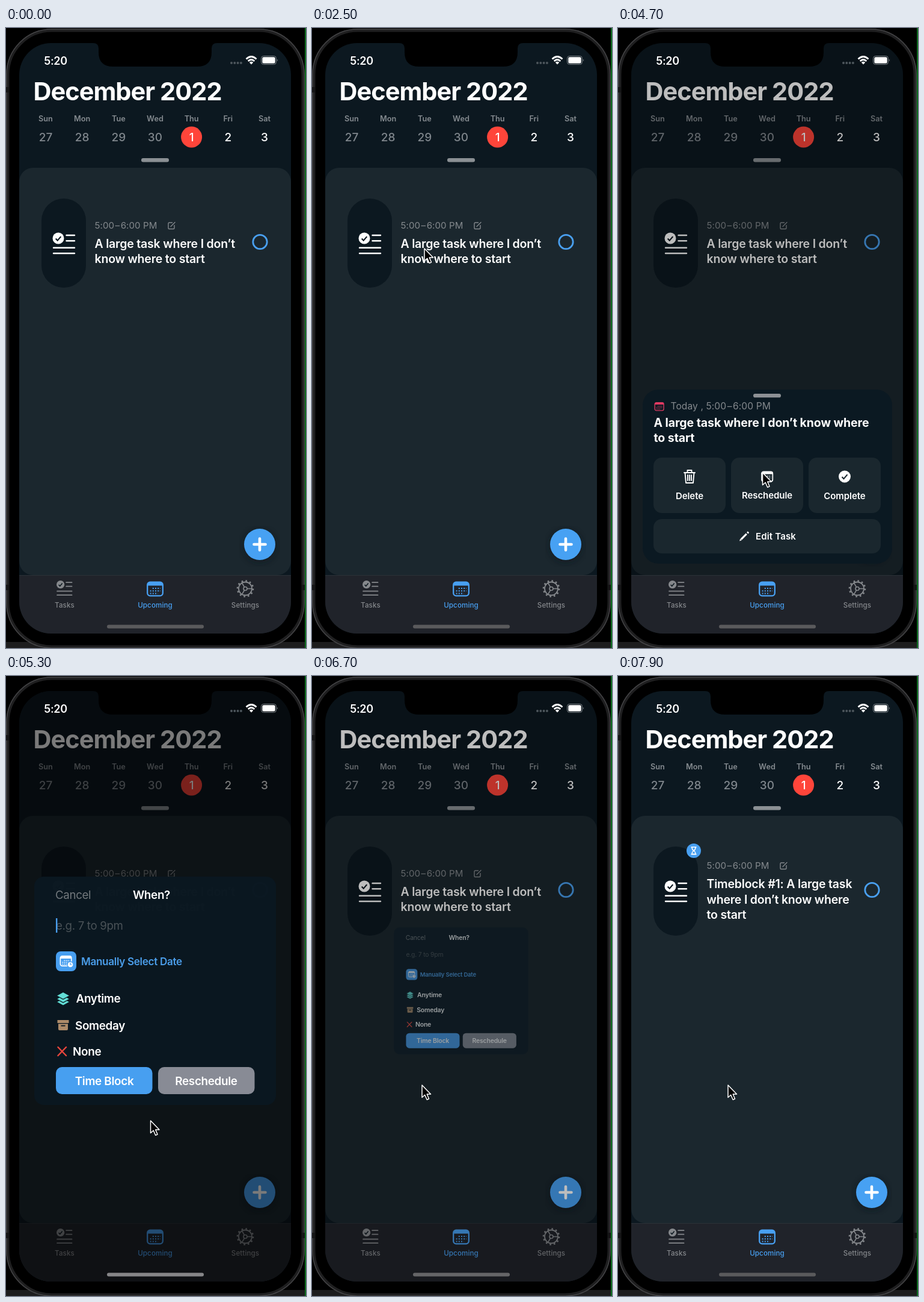
An HTML page that plays this animation: 499 px wide and 1029 px high, repeating every 8000 ms.

```html
<!DOCTYPE html>
<html lang="en">
<head>
<meta charset="utf-8">
<title>Time block a task</title>
<style>
html, body { margin: 0; height: 100%; overflow: hidden; background: #000; }
svg { display: block; width: 499px; height: 1029px; }
text { font-family: Inter, "Open Sans", sans-serif; font-optical-sizing: none; fill: #fff; white-space: pre; }
.mid { text-anchor: middle; }
.title { font-size: 41.5px; font-weight: 700; letter-spacing: -.0235em; }
.body { font-size: 19.5px; font-weight: 600; letter-spacing: -.01em; }
.bold { font-weight: 700; letter-spacing: -.004em; }
.small { font-size: 15px; font-weight: 600; letter-spacing: -.004em; }
.time { font-size: 15.1px; font-weight: 400; letter-spacing: .005em; fill: #84898d; }
.day { font-size: 12.7px; font-weight: 600; fill: #858b90; }
.date { font-size: 19px; font-weight: 500; }
.tab { font-size: 11.6px; font-weight: 500; fill: #85888c; letter-spacing: .01em; }
#modal .body { font-size: 18.9px; letter-spacing: -.018em; }
#modal .thin { font-size: 18.7px; font-weight: 400; }
#modal .link { font-size: 17.1px; fill: #4b9eea; }
.line { fill: none; stroke: currentColor; stroke-linecap: round; stroke-linejoin: round; }
</style>
</head>
<body>
<svg viewBox="0 0 499 1029">
  <defs>
    <clipPath id="screen"><rect x="22" y="25" width="452" height="980" rx="53"/></clipPath>
    <filter id="blur"><feGaussianBlur stdDeviation="5"/></filter>
    <symbol id="list" overflow="visible">
      <circle cx="9.5" cy="9.5" r="9.5" fill="currentColor"/>
      <path d="M5.2 10l3 3.2 5.6-6.6" fill="none" stroke="#0d1820" stroke-width="2.2"/>
      <path class="line" stroke-width="2.400" d="M23 4.500H36.500M23 13.800H36.500M1.500 25.200H36.500M1.500 34.500H36.500"/>
    </symbol>
    <symbol id="calendar" overflow="visible">
      <rect class="line" x="1.200" y="1.200" width="25.600" height="22.600" rx="4.500" stroke-width="2.300"/>
      <path d="M1 7V5q0-4 4-4H23q4 0 4 4V7z" fill="currentColor"/>
      <path d="M9.800 11.500H23M5.600 15.700H23M5.600 19.900H18.500" stroke="currentColor" stroke-width="2" stroke-dasharray="2 2.200" fill="none"/>
    </symbol>
    <symbol id="edit" overflow="visible">
      <path class="line" stroke-width="1.400" d="M7 1H2Q.5 1 .5 2.500V10Q.5 11.500 2 11.500H9Q10.500 11.500 10.500 10V5.500M4.500 7.500L11.500 .5"/>
    </symbol>
  </defs>

  <!-- phone body -->
  <rect width="499" height="1029" fill="#000"/>
  <rect y="1019" width="499" height="10" fill="#1d1d1e"/>
  <rect x="3" y="4" width="491" height="1023" rx="73" fill="#000" stroke="#1f1f20" stroke-width="5"/>
  <rect x="1" y="2" width="495" height="1027" rx="75" fill="none" stroke="#454547" stroke-width="1.500"/>
  <path d="M0 98H5V107H0zM0 924H5V933H0zM492 924H497V933H492z" fill="#151516"/>
  <path d="M498 0V1029" stroke="#0a6a1c" stroke-width="2"/>

  <g clip-path="url(#screen)">
    <rect x="22" y="25" width="452" height="980" fill="#0c1820"/>
    <text class="title" x="45.500" y="120">December 2022</text>
    <g id="week"></g>
    <rect x="225" y="216" width="46" height="6.500" rx="3.200" fill="#8b9094"/>
    <rect x="22" y="232" width="452" height="676" rx="23" fill="#1b272e"/>

    <rect x="59" y="283" width="74" height="148" rx="37" fill="#0c1820"/>
    <use href="#list" x="77.500" y="339.500" color="#fff"/>
    <g id="before">
      <text class="time" x="147.500" y="333">5:00&#8202;–&#8202;6:00 PM</text>
      <use href="#edit" x="269.500" y="322" color="#84898d"/>
      <text class="body" x="147.500" y="364.500">A large task where I don’t</text>
      <text class="body" x="147.500" y="390">know where to start</text>
    </g>
    <g id="after">
      <text class="time" x="147.500" y="320">5:00&#8202;–&#8202;6:00 PM</text>
      <use href="#edit" x="269.500" y="309" color="#84898d"/>
      <text class="body" x="147.500" y="352">Timeblock #1: A large task</text>
      <text class="body" x="147.500" y="377.500">where I don’t know where</text>
      <text class="body" x="147.500" y="403">to start</text>
      <circle cx="126" cy="290" r="12" fill="#489ff0"/>
      <path d="M121.500 284H130.500M121.500 296H130.500M123 284.500Q123 288 126 290Q123 292 123 295.500H129Q129 292 126 290Q129 288 129 284.500" fill="none" stroke="#fff" stroke-width="1.500"/>
    </g>
    <circle cx="422.500" cy="355" r="11.700" fill="none" stroke="#499fef" stroke-width="2.800"/>

    <circle cx="422" cy="860" r="28" fill="#0a141a" opacity=".5" filter="url(#blur)"/>
    <circle cx="422" cy="857" r="26" fill="#47a1f3"/>
    <path class="line" color="#fff" stroke-width="4.600" d="M412.500 857H431.500M422 847.500V866.500"/>

    <rect id="sheetDim" x="22" y="25" width="452" height="883"/>

    <g id="sheet">
      <rect x="41" y="600" width="415" height="289" rx="26" fill="#0b1922"/>
      <rect x="225" y="607" width="46" height="6.300" rx="3.100" fill="#8d9195"/>
      <use href="#calendar" transform="translate(60.500 621) scale(.58)" color="#e03a62"/>
      <text class="time" x="87.500" y="633.500" style="font-size:15.600px">Today , 5:00&#8202;–&#8202;6:00 PM</text>
      <text class="body bold" x="59.500" y="662">A large task where I don’t know where</text>
      <text class="body bold" x="59.500" y="687.500">to start</text>
      <g fill="#1a272e">
        <rect x="59" y="713" width="120" height="92" rx="14"/>
        <rect x="188" y="713" width="120" height="92" rx="14"/>
        <rect x="317" y="713" width="120" height="92" rx="14"/>
        <rect x="59" y="815" width="378" height="57" rx="14"/>
      </g>
      <path class="line" color="#fff" stroke-width="1.900" d="M110 738H128M115.500 737V734H122.500V737M111.500 738L113 755H125L126.500 738M116 742V751M119 742V751M122 742V751"/>
      <use href="#calendar" transform="translate(238 735.500) scale(.72)" color="#fff"/>
      <circle cx="377" cy="744.500" r="10" fill="#fff"/>
      <path d="M372.500 745l3 3.200 6-7" fill="none" stroke="#1a272e" stroke-width="2"/>
      <text class="small mid" x="119" y="782.500">Delete</text>
      <text class="small mid" x="248" y="781">Reschedule</text>
      <text class="small mid" x="377" y="782.500">Complete</text>
      <path d="M202 851.500l1.300-3.800 2.500 2.500z" fill="#fff"/>
      <path d="M204.800 848.700L213.800 839.700M215.200 838.300L217 836.500" stroke="#fff" stroke-width="3.200"/>
      <text class="small" x="229" y="849" style="letter-spacing:.01em">Edit Task</text>
    </g>

    <rect x="22" y="908" width="452" height="97" fill="#20232a"/>
    <path d="M22 908.500H474" stroke="#2b3137"/>
    <use href="#list" transform="translate(84 917) scale(.7)" color="#85888c"/>
    <use href="#calendar" x="234" y="918.500" color="#48a0f2"/>
    <g class="line" color="#85888c" transform="translate(398 930.500)">
      <circle r="11" stroke-width="1.800"/>
      <circle r="13" stroke-width="2.600" stroke-dasharray="2.600 4.207" stroke-linecap="butt"/>
      <circle r="3" stroke-width="1.600"/>
      <path stroke-width="1.600" d="M3 0H11M-1.500-2.600L-5.500-9.500M-1.500 2.600L-5.500 9.500"/>
    </g>
    <text class="tab mid" x="97.500" y="961.500">Tasks</text>
    <text class="tab mid" x="248" y="961.500" style="fill:#48a0f2">Upcoming</text>
    <text class="tab mid" x="398" y="961.500">Settings</text>

    <rect id="modalDim" x="22" y="25" width="452" height="980"/>

    <g id="modal">
      <rect x="47" y="333" width="402" height="379" rx="16" fill="#0b1821" opacity=".98"/>
      <text class="body thin" x="82" y="370" style="fill:#73797d">Cancel</text>
      <text class="body mid" x="242" y="370">When?</text>
      <text class="body thin" x="83" y="420.500" style="fill:#4a5257">e.g. 7 to 9pm</text>
      <rect id="caret" x="83" y="402" width="2.400" height="24" fill="#499fef"/>
      <rect x="83" y="457" width="34" height="33" rx="8" fill="#489ff0"/>
      <use href="#calendar" transform="translate(89.500 464) scale(.72)" color="#fff"/>
      <circle cx="107" cy="479" r="5" fill="#fff" stroke="#489ff0" stroke-width="1.300"/>
      <path d="M107 476V479H109.500" fill="none" stroke="#489ff0" stroke-width="1.200"/>
      <text class="body link" x="125" y="479.500">Manually Select Date</text>
      <g fill="#62ded6" stroke="#0b1821" stroke-width="1.200">
        <path d="M84 541L95 535 106 541 95 547z"/>
        <path d="M84 536L95 530 106 536 95 542z"/>
        <path d="M84 530.500L95 524.500 106 530.500 95 536.500z"/>
      </g>
      <path d="M85.500 571H104.500V576H85.500zM87 577.200H103V586Q103 588 101 588H89Q87 588 87 586z" fill="#ad8b69"/>
      <path d="M91.500 580.500H98.500" stroke="#0b1821" stroke-width="1.800"/>
      <path class="line" color="#e8463d" stroke-width="2.500" d="M86.500 616L100 630M100 616L86.500 630"/>
      <text class="body" x="116.500" y="542">Anytime</text>
      <text class="body" x="115" y="586.500">Someday</text>
      <text class="body" x="111" y="629.500">None</text>
      <rect x="83" y="649" width="160.500" height="45" rx="10" fill="#479ff0"/>
      <rect x="253" y="649" width="160.500" height="45" rx="10" fill="#888b95"/>
      <text class="body mid" x="163.500" y="678.500">Time Block</text>
      <text class="body mid" x="333" y="678.500">Reschedule</text>
    </g>
  </g>

  <!-- status bar and notch -->
  <path d="M145 24V25Q154 25 154 34V40Q154 64 178 64H318Q342 64 342 40V34Q342 25 351 25V24z" fill="#000"/>
  <text class="mid" x="82.500" y="60.500" style="font-size:18px;font-weight:600;letter-spacing:-.02em">5:20</text>
  <path d="M375 58H393" class="line" color="#4d565c" stroke-width="4" stroke-dasharray="0 5.300"/>
  <g fill="none" stroke="#fff" stroke-width="2.700">
    <path d="M399.500 51.500Q408 43.500 416.500 51.500M402.700 55Q408 50 413.300 55"/>
  </g>
  <path d="M404.800 57.200Q408 54.500 411.200 57.200L408 60.500z" fill="#fff"/>
  <rect x="424.500" y="46.500" width="25" height="14" rx="4" fill="none" stroke="#7b8287"/>
  <rect x="426.300" y="48.300" width="21.400" height="10.400" rx="2.500" fill="#fff"/>
  <path d="M451 51.500q2 2 0 4z" fill="#7b8287"/>
  <rect id="home" x="168" y="990.500" width="161" height="6" rx="3"/>
  <path id="cursor" d="M0 0V20.500L4.700 16.300 8.200 24.300 11.500 22.800 8.200 15H14.500z" fill="#000" stroke="#fff" stroke-width="1.500" stroke-linejoin="round"/>
</svg>
<script>
const LOOP = 8000, STEP = 100;
const el = id => document.getElementById(id);
const show = (id, opacity) => el(id).setAttribute("opacity", opacity);
const move = (id, transform) => el(id).setAttribute("transform", transform);
const mix = (a, b, p) => a + (b - a) * p;

// Eased progress from 0 to 1 between two times.
function ease(t, from, to) {
  const p = Math.min(1, Math.max(0, (t - from) / (to - from)));
  return p * p * (3 - 2 * p);
}

el("week").innerHTML = ["Sun", "Mon", "Tue", "Wed", "Thu", "Fri", "Sat"].map((day, i) => {
  const x = 66 + i * 60.65, date = (i + 26) % 30 + 1, today = i === 4;
  return `<text class="day mid" x="${x}" y="154.500">${day}</text>` +
    (today ? `<circle cx="${x}" cy="181" r="17.500" fill="#ff453a"/>` : "") +
    `<text class="date mid" x="${x}" y="188" style="fill:${i < 4 ? "#7f868c" : "#fff"}">${date}</text>`;
}).join("");

// Cursor moves: start, end, x, y.
const START = [237, 927];
const MOVES = [[1400, 2400, 187, 366], [4000, 4500, 240.5, 738], [5700, 6200, 183, 679]];

function sheetOffset(t) {
  const s = (t - 3550) / 1000;
  const rise = s < 0 ? 1 : Math.exp(-11.5 * s) * Math.cos(9 * s);
  return 440 * (rise + ease(t, 4750, 5150));
}

function draw(t) {
  const sheetOpen = ease(t, 3500, 3850) - ease(t, 4800, 5150);
  const modalOpen = ease(t, 4950, 5300) - ease(t, 6500, 6900);
  const switched = ease(t, 7100, 7400);

  move("sheet", `translate(0 ${sheetOffset(t)})`);
  show("sheetDim", 0.26 * sheetOpen);

  move("modal", `translate(248 522.500) scale(${mix(0.11, 1, modalOpen)}) translate(-248 -522.500)`);
  show("modal", modalOpen ** 0.8);
  show("modalDim", 0.52 * modalOpen);
  show("caret", modalOpen === 1 && (t - 5300) % 1000 < 500 ? 1 : 0);

  show("before", 1 - switched);
  show("after", switched);

  const grey = mix(90, 134, modalOpen ** 2);
  el("home").setAttribute("fill", `rgb(${grey},${grey},${grey + 2})`);

  let [x, y] = START;
  for (const [from, to, nextX, nextY] of MOVES) {
    const p = ease(t, from, to);
    x = mix(x, nextX, p);
    y = mix(y, nextY, p);
  }
  move("cursor", `translate(${x} ${y})`);
  show("cursor", t < 1200 ? 0 : 1);
}

const begin = performance.now();
function tick() {
  const t = (performance.now() - begin) % LOOP;
  draw(Math.floor(t / STEP) * STEP);
  requestAnimationFrame(tick);
}
tick();
</script>
</body>
</html>
```
